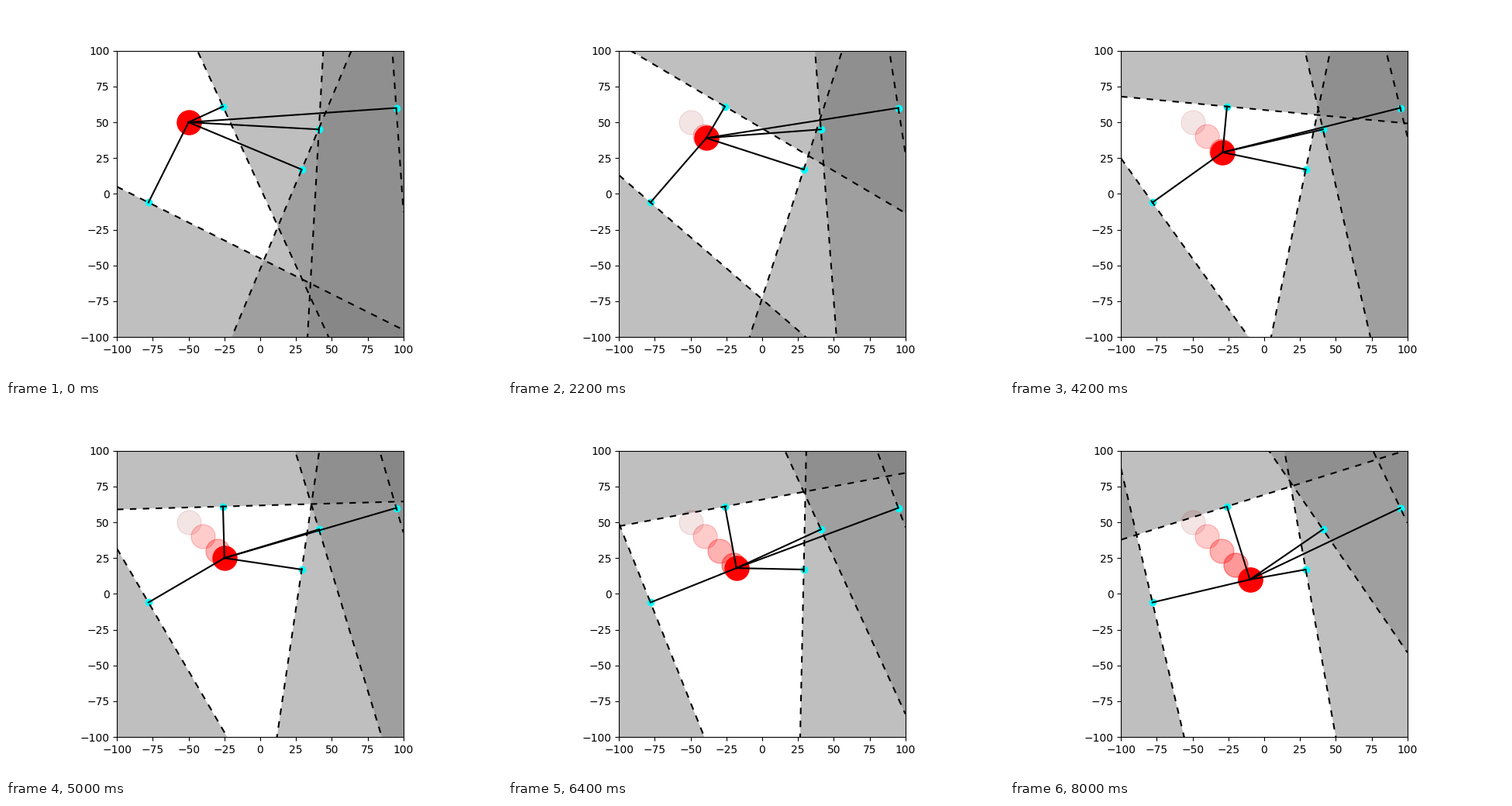
Write a matplotlib script that moves like this. It is 640 by 480 pixels and loops after 8200 ms.

```python
import numpy as np
import matplotlib.pyplot as plt
from matplotlib.animation import FuncAnimation

FRAMES, INTERVAL = 41, 200
LIM, FAR = 100, 1000
POINTS = np.array([(-26, 61), (29, 17), (41, 45), (95, 60), (-78, -6)], float)
START = np.array([-50.0, 50.0])
STEP = np.array([1.0, -1.0])
TRAIL_EVERY = 10

plt.rcParams["font.family"] = "DejaVu Sans"
fig, ax = plt.subplots(figsize=(6.4, 4.8), dpi=100)
ax.set_aspect("equal")
ax.set(xlim=(-LIM, LIM), ylim=(-LIM, LIM))
ticks = np.arange(-LIM, LIM + 1, 25)
ax.set_xticks(ticks)
ax.set_yticks(ticks)


def position(i):
    return START + STEP * i


def half_plane(p, d):
    """Quad covering everything beyond p in direction d."""
    d = d / np.hypot(*d)
    n = np.array([-d[1], d[0]])
    a, b = p - FAR * n, p + FAR * n
    return [a, b, b + 2 * FAR * d, a + 2 * FAR * d]


def border(p, d):
    """Line through p perpendicular to d, spanning the plot width."""
    if d[1] == 0:
        return [p[0], p[0]], [-LIM, LIM]
    x = np.array([-LIM, LIM])
    return x, p[1] - d[0] / d[1] * (x - p[0])


shades = [
    ax.add_patch(plt.Polygon(half_plane(p, p - START), facecolor="gray",
                             alpha=0.5, linewidth=0, zorder=1))
    for p in POINTS
]
trail = [
    ax.scatter(*position(k * TRAIL_EVERY), s=500, alpha=0.1 * (k + 1),
               color="red" if k else (0.6, 0, 0), zorder=1.2)
    for k in range(5)
]
robot = ax.scatter(*START, s=500, color="red", zorder=1.4)
ax.scatter(*POINTS.T, s=36, color="cyan", zorder=1.5)
borders = [ax.plot([], [], "k", lw=1.5, dashes=[4, 4])[0] for _ in POINTS]
rays = [ax.plot([], [], "k-", lw=1.5)[0] for _ in POINTS]


def update(i):
    pos = position(i)
    robot.set_offsets([pos])
    for k, ghost in enumerate(trail):
        ghost.set_visible(i >= k * TRAIL_EVERY)
    for p, shade, edge, ray in zip(POINTS, shades, borders, rays):
        d = p - pos
        shade.set_xy(half_plane(p, d))
        edge.set_data(*border(p, d))
        ray.set_data([pos[0], p[0]], [pos[1], p[1]])
    return [*shades, *trail, robot, *borders, *rays]


anim = FuncAnimation(fig, update, frames=FRAMES, interval=INTERVAL,
                     init_func=lambda: update(0), repeat=True)
plt.show()
```
